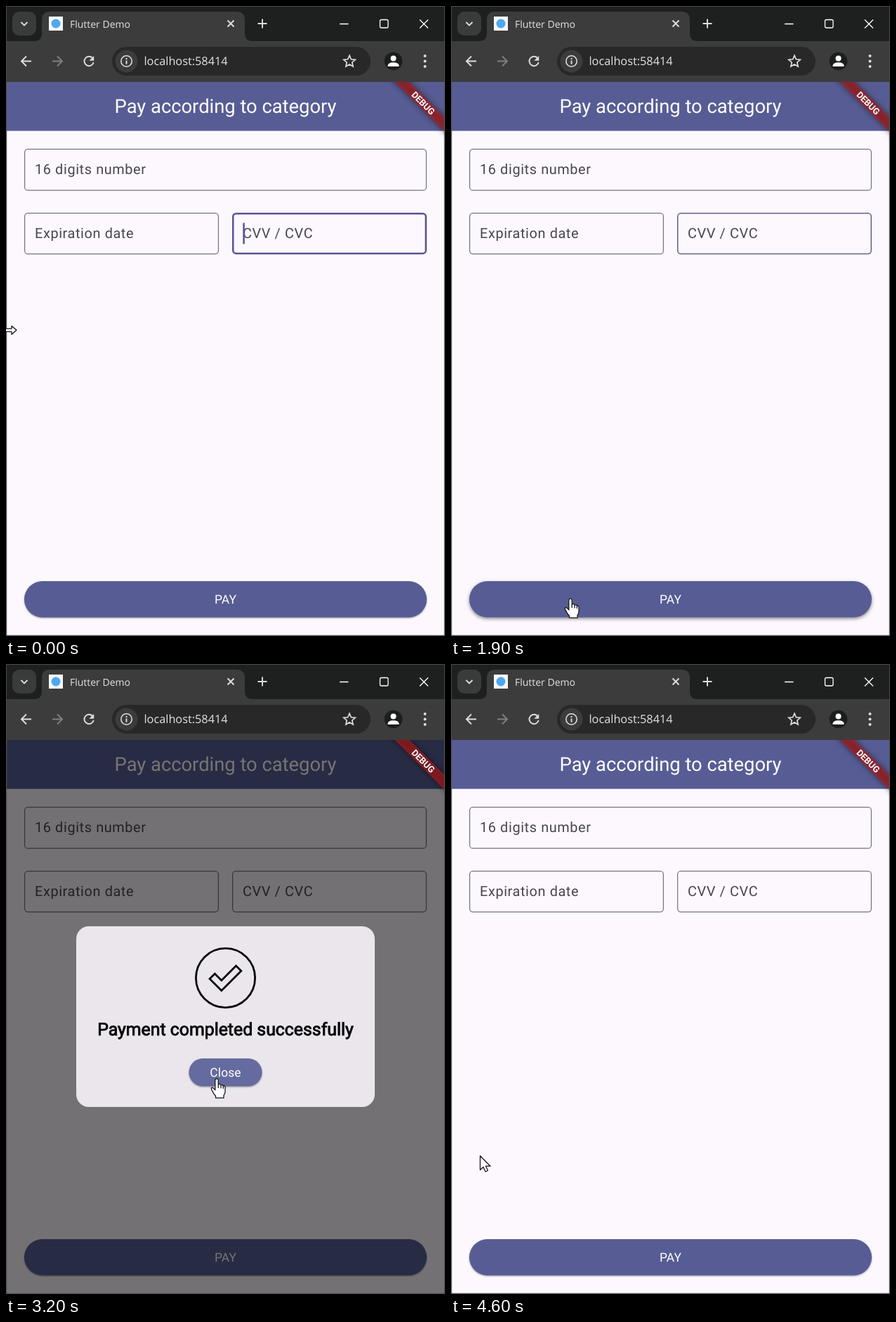
Animation, 625 px wide and 896 px high, one loop 4.7 s. Source, as an HTML page:

```html
<!DOCTYPE html>
<html lang="en">
<head>
<meta charset="utf-8">
<title>Payment form</title>
<style>
  html, body { margin: 0; width: 100%; height: 100%; overflow: hidden; background: #fcf8fe; }
  svg { display: block; width: 625px; height: 896px; }
  text { font-family: Roboto, Arial, sans-serif; white-space: pre; text-rendering: geometricPrecision; }
  .ui { font-family: "Open Sans", "Noto Sans", sans-serif; fill: #e3e3e3; }
  .mid { text-anchor: middle; fill: #fff; }
  .label { font-size: 19.88px; letter-spacing: .62px; fill: #49454f; }
  .button { font-size: 17.4px; letter-spacing: .12px; }
  .field { fill: none; stroke: #79747e; stroke-width: 1.25; }
  .icon { fill: none; stroke: #dedede; stroke-width: 1.9; }
  .raised { filter: drop-shadow(0 1px 1.2px rgba(0,0,0,.4)); }
  .raised.hover { filter: drop-shadow(0 2px 2.5px rgba(0,0,0,.45)); }
  .pointer { fill: #fff; stroke: #111; stroke-width: 1.25; stroke-linejoin: round; }
</style>
</head>
<body>
<svg viewBox="0 0 625 896">
  <defs>
    <clipPath id="page"><rect x="1" y="108" width="623" height="787"/></clipPath>
    <filter id="blur" x="-30%" y="-100%" width="160%" height="300%"><feGaussianBlur stdDeviation="4"/></filter>
  </defs>

  <!-- browser window -->
  <rect width="625" height="109" fill="#1e2020"/>
  <path fill="#3c3c3c" d="M0 50H40Q51 50 51 39V20Q51 8 63 8H328Q340 8 340 20V39Q340 50 351 50H625V108H0Z"/>
  <rect x="9" y="8" width="34" height="34" rx="10" fill="#3a3b3b"/>
  <path class="icon" d="M21.5 23L26 27.5 30.5 23"/>
  <rect x="61" y="15" width="20" height="20" fill="#f6f9fc"/>
  <circle cx="71" cy="25" r="6.5" fill="#4fa8ee"/>
  <text class="ui" x="91" y="31" font-size="14">Flutter Demo</text>
  <path class="icon" d="M315.5 20.5l9 9m0-9l-9 9M358.5 25h13M365 18.5v13"/>
  <g class="icon" style="stroke:#fff;stroke-width:1.3">
    <path d="M475 25.5h12.5M589 19.5l12 12m0-12l-12 12"/>
    <rect x="532.5" y="19.5" width="11.5" height="11.5" rx="2"/>
  </g>
  <path class="icon" d="M36 78.5H22.5M29 71.5l-7 7 7 7"/>
  <path class="icon" style="stroke:#808080" d="M66 78.5H79.5M73 71.5l7 7-7 7"/>
  <path class="icon" d="M123.6 74.5A6.7 6.7 0 1 0 124.7 80"/>
  <path fill="#dedede" d="M125.2 71v6.8h-6.8Z"/>
  <rect x="151" y="58" width="368" height="41" rx="20.5" fill="#282828"/>
  <circle cx="171.5" cy="78.5" r="16" fill="#3c3c3c"/>
  <circle class="icon" cx="171.5" cy="78.5" r="7.7" style="stroke-width:1.6"/>
  <path class="icon" d="M171.5 77.5v5.2M171.5 74v2"/>
  <text class="ui" x="196.5" y="84.3" font-size="16.3">localhost:58414</text>
  <path id="star" class="icon" style="stroke-width:1.7"/>
  <circle cx="551.5" cy="78.5" r="12.8" fill="#1c1d1d"/>
  <circle cx="551.5" cy="74.5" r="4" fill="#fff"/>
  <path fill="#fff" d="M543.5 86V84.5Q544 80.5 551.5 80.3 559 80.5 559.5 84.5V86Z"/>
  <g fill="#dedede"><circle cx="596.5" cy="71" r="2"/><circle cx="596.5" cy="78.5" r="2"/><circle cx="596.5" cy="86" r="2"/></g>

  <!-- page -->
  <g clip-path="url(#page)">
    <rect y="108" width="625" height="788" fill="#fcf8fe"/>
    <rect y="108" width="625" height="69.6" fill="#575d94"/>
    <text class="mid" x="312.5" y="152" font-size="27.33">Pay according to category</text>
    <rect id="number" class="field" x="26.6" y="203.6" width="571.8" height="58.6" rx="4.5"/>
    <rect class="field" x="26.6" y="294.5" width="275.8" height="58.1" rx="4.5"/>
    <rect id="cvv" class="field" rx="4.5"/>
    <text class="label" x="41" y="239">16 digits number</text>
    <text class="label" x="41" y="330">Expiration date</text>
    <text class="label" x="337" y="330">CVV / CVC</text>
    <rect id="caret" x="337.3" y="308.5" width="2.5" height="30" fill="#5b5294"/>
    <rect id="pay" class="raised" x="26" y="818" width="573" height="51.5" rx="25.75" fill="#575d94"/>
    <text class="mid button" x="312.5" y="850">PAY</text>

    <rect id="scrim" y="108" width="625" height="788"/>
    <g id="dialog">
      <rect x="100" y="373" width="425" height="257" rx="18" fill="#eae6ec"/>
      <g fill="none" stroke="#08080a" stroke-width="2.8">
        <circle cx="312.5" cy="446.5" r="42.1"/>
        <path d="M290 447.7L297.3 440.4 306.8 449.9 327.5 429.2 334.8 436.5 306.8 464.5Z"/>
      </g>
      <text x="312.5" y="528" font-size="24.85" text-anchor="middle" fill="#08080a" stroke="#08080a" stroke-width=".9">Payment completed successfully</text>
      <rect id="close" class="raised" x="260.5" y="561" width="104" height="39.5" rx="19.75"/>
      <text class="mid button" x="312.5" y="587">Close</text>
    </g>

    <g transform="translate(624 108) rotate(45)">
      <rect x="-60" y="35" width="120" height="15" opacity=".5" filter="url(#blur)"/>
      <rect x="-60" y="35" width="120" height="15" fill="#b71c1c" opacity=".63"/>
      <text class="mid" y="47" font-size="12.7" font-weight="700">DEBUG</text>
    </g>
  </g>
  <path fill="none" stroke="#505154" stroke-width="1.25" d="M.6 108V895.4H624.4V108"/>
  <path fill="none" stroke="#4a4b4c" d="M.5 108V.5H624.5V108"/>

  <!-- pointers, with the hot spot at the origin -->
  <g id="pointers">
    <path id="resize" class="pointer" d="M-4-2.2H8V-6L15 0 8 6V2.2H-4Z"/>
    <path id="arrow" class="pointer" d="M.5 .5V20.5L5 16.5 8 23 11.5 21.5 8.5 15.2H15Z"/>
    <g id="beam" fill="none">
      <path stroke="#fff" stroke-width="3.5" d="M0-10V10"/>
      <path stroke="#111" stroke-width="1.7" d="M-5.5-10H-1.5L0-9 1.5-10H5.5M0-9.5V9.5M-5.5 10H-1.5L0 9 1.5 10H5.5"/>
    </g>
    <g id="hand" class="pointer">
      <path d="M-2.2 2.5Q0-1.5 2.2 2.5V9Q5 7.5 6 10 8.2 8.8 9.3 11 12 10.5 12 13.5V19Q12 22 10 24.5V28H-1.5V25.5Q-4 23-7 17-8.5 13.5-6.5 13.3-4.5 13.5-2.2 17Z"/>
      <path fill="none" d="M2.2 9V14M6 10V14.5M9.3 11V15"/>
    </g>
  </g>
</svg>

<script>
const LOOP = 4700, STEP = 100;
const $ = id => document.getElementById(id);

// Each row holds from its start time until the next row.
const pointer = [
  [0, "resize", 0, 461], [100, ""],
  [500, "arrow", 12, 188], [600, "beam", 68, 238], [700, "beam", 112, 430],
  [800, "arrow", 138, 640], [900, "arrow", 158, 795], [1000, "hand", 170, 842],
  [2000, "arrow", 169.5, 841.5],
  [2500, "arrow", 178, 820], [2600, "arrow", 202, 760], [2700, "arrow", 238, 685],
  [2800, "arrow", 270, 630], [2900, "hand", 290, 598], [3000, "hand", 300, 589],
  [3700, "arrow", 300, 588.5],
  [4300, "arrow", 262, 606], [4400, "arrow", 200, 635],
  [4500, "arrow", 113, 680], [4600, "arrow", 41, 699]
];
const caret = [[0, 1], [200, 0], [800, 1], [1300, 0]];
const focus = [[0, 2.5, "#5b5294"], [1800, 2, "#5b5294"], [1900, 1.5, "#66618a"], [2000, 1.25, "#79747e"]];
const modal = [[0, 0], [2000, .95], [2100, 1], [3700, .4], [3800, 0]];

const at = (rows, t) => rows.filter(row => row[0] <= t).pop();
const within = (t, from, to) => t >= from && t < to;

function setAttrs(el, attrs) {
  for (const name in attrs) el.setAttribute(name, attrs[name]);
}

function drawStar() {
  const points = Array.from({ length: 10 }, (_, i) => {
    const a = (i / 5 - .5) * Math.PI, r = i % 2 ? 4 : 8.7;
    return `${489 + r * Math.cos(a)} ${79 + r * Math.sin(a)}`;
  });
  setAttrs($("star"), { d: `M${points.join("L")}Z` });
}

// The outline grows inwards from a fixed outer edge.
function drawFocus(width, color) {
  setAttrs($("cvv"), { x: 322 + width / 2, y: 293.9 + width / 2, width: 277 - width, height: 59.3 - width });
  $("cvv").style.strokeWidth = width;
  $("cvv").style.stroke = color;
}

function render(t) {
  const [, shape, x, y] = at(pointer, t);
  for (const el of $("pointers").children) {
    el.style.display = el.id === shape ? "" : "none";
    if (el.id === shape) setAttrs(el, { transform: `translate(${x} ${y})` });
  }
  const [, width, color] = at(focus, t);
  drawFocus(width, color);
  $("number").style.stroke = within(t, 600, 800) ? "#1d1b20" : "";
  $("caret").style.opacity = at(caret, t)[1];
  $("pay").classList.toggle("hover", within(t, 1000, 2100));

  const shown = at(modal, t)[1];
  $("scrim").style.opacity = .54 * shown;
  $("dialog").style.opacity = shown;
  $("close").style.fill = within(t, 2900, 3700) ? "#666b9f" : "#5b6197";
}

function tick() {
  const t = performance.now() % LOOP;
  render(Math.floor(t / STEP) * STEP);
  requestAnimationFrame(tick);
}

drawStar();
tick();
</script>
</body>
</html>
```
